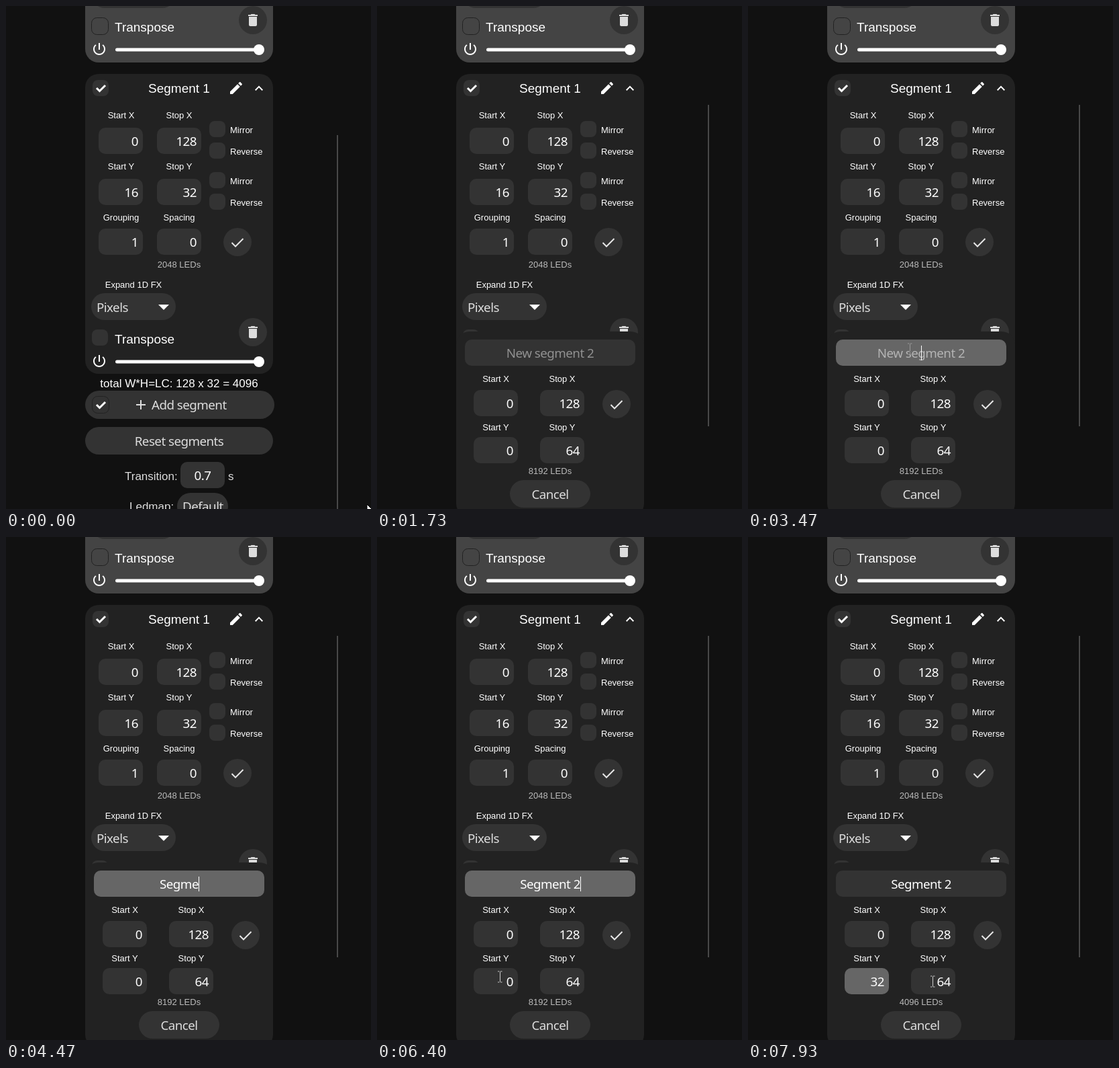
An HTML page that plays this animation: 544x748 px, repeating every 8000 ms.

```html
<!DOCTYPE html>
<html lang="en">
<head>
<meta charset="utf-8">
<title>Segment editor</title>
<style>
  html, body { margin: 0; width: 100%; height: 100%; overflow: hidden; background: #111; }
  svg { display: block; width: 544px; height: 748px; }
  text { white-space: pre; fill: #fff; font-family: "Liberation Sans", Arial, sans-serif; }
  .ui { font: 18.8px "Noto Sans", Tahoma, sans-serif; letter-spacing: -.55px; }
  .dim { fill: #ddd; }
  .note { fill: #bbb; }
  #beam { mix-blend-mode: difference; }
</style>
</head>
<body>
<svg id="stage" viewBox="0 0 544 748" xmlns="http://www.w3.org/2000/svg"></svg>
<script>
const LOOP = 8000, STEP = 1000 / 15;
const stage = document.getElementById('stage');

// ---- drawing helpers ----
const box = (x, y, w, h, r, fill = '#333', more = '') =>
  `<rect x="${x}" y="${y}" width="${w}" height="${h}" rx="${r}" fill="${fill}" ${more}/>`;
const text = (s, x, y, size, anchor = 'middle', more = '') =>
  `<text x="${x}" y="${y}" font-size="${size}" text-anchor="${anchor}" ${more}>${s}</text>`;
const ui = (s, x, y, anchor = 'middle', more = 'class="ui"') =>
  `<text x="${x}" y="${y}" text-anchor="${anchor}" ${more}>${s}</text>`;
const label = (s, x, y, anchor) => text(s, x, y, 13, anchor);
const icon = (d, x, y, fill = '#fff') => `<path d="${d}" transform="translate(${x} ${y})" fill="${fill}"/>`;
const stroke = (d, w, color = '#fff') => `<path d="${d}" fill="none" stroke="${color}" stroke-width="${w}"/>`;
const field = (s, x, y, id = '') =>
  box(x, y, 66, 39, 10, '#333', id && `id="${id}Box"`) +
  ui(s, x + 59, y + 27, 'end', `class="ui" id="${id}"`);
const tick = (x, y) => stroke(`M${x - 6} ${y}l4.5 4.5l8.5-8.5`, 3);
const okButton = (x, y) => `<circle cx="${x}" cy="${y}" r="21" fill="#333"/>` +
  stroke(`M${x - 8.5} ${y + 1}l5.5 5.5l11.5-11.5`, 2, '#e6e6e6');

const EDIT = 'M3 17.25V21h3.75L17.81 9.94l-3.75-3.75L3 17.25zM20.71 7.04c.39-.39.39-1.02 0-1.41l-2.34-2.34c-.39-.39-1.02-.39-1.41 0l-1.83 1.83 3.75 3.75 1.83-1.83z';
const UP = 'M12 8l-6 6 1.41 1.41L12 10.83l4.59 4.58L18 14z';
const BIN = 'M6 19c0 1.1.9 2 2 2h8c1.1 0 2-.9 2-2V7H6v12zM19 4h-3.5l-1-1h-5l-1 1H5v2h14V4z';
const POWER = 'M13 3h-2v10h2V3zm4.83 2.17l-1.42 1.42C17.99 7.86 19 9.81 19 12c0 3.87-3.13 7-7 7s-7-3.13-7-7c0-2.19 1.01-4.14 2.58-5.42L6.17 5.17C4.23 6.82 3 9.26 3 12c0 4.97 4.03 9 9 9s9-4.03 9-9c0-2.74-1.23-5.18-3.17-6.83z';

// lower part of a segment card
const cardFoot = (dy, check) => `<g transform="translate(0 ${dy})">
  ${box(127, 427, 126, 40, 20)}${check}
  ${text('Transpose', 162, 502, 19, 'start')}
  <circle cx="368" cy="485" r="21" fill="#333"/>${icon(BIN, 356, 473, '#ddd')}
  ${icon(POWER, 127, 516)}
  ${box(163, 526.5, 221, 5, 2.5, '#fff')}<circle cx="377" cy="529" r="8" fill="#fff"/></g>`;

const rows = [['Start X', 'Stop X', 0, 128, 181], ['Start Y', 'Stop Y', 16, 32, 257], ['Grouping', 'Spacing', 1, 0, 331]];

const topCard = box(118, -60, 280, 144, 20, '#444') +
  cardFoot(-464, box(127.5, 481.5, 25, 25, 8, '#444', 'stroke="#222"'));

const card = box(118, 101, 280, 446, 20, '#222') +
  box(129, 110, 24, 24, 8) + tick(141, 122) +
  text('Segment 1', 258, 129, 19) + icon(EDIT, 331, 110) + icon(UP, 365, 110.5) +
  rows.map(([a, b, u, v, y], i) => {
    const ly = 167 + 76 * i;
    return label(a, 171.5, ly) + label(b, 258, ly) + field(u, 138, y) + field(v, 225, y);
  }).join('') +
  [171, 203, 247, 279].map((y, i) =>
    box(303, y, 24, 24, 8) + label(i % 2 ? 'Reverse' : 'Mirror', 334, y + 18, 'start')).join('') +
  okButton(345, 351) +
  text('2048 LEDs', 258, 389, 13, 'middle', 'class="note"') +
  label('Expand 1D FX', 190, 419) +
  cardFoot(0, box(128, 481, 24, 24, 8)) +
  ui('Pixels', 135, 455, 'start', 'class="ui dim"') +
  '<path d="M227 444h16l-8 8z" fill="#fff"/>';

const listEnd = `<g id="listEnd">
  ${text('total W*H=LC: 128 x 32 = 4096', 258, 567, 17)}
  ${box(118, 572, 282, 42, 21, '#333', 'id="add"')}
  ${box(128.5, 580.5, 25, 25, 8, '#333', 'stroke="#222"')}${tick(141, 593)}
  ${stroke('M194 593h14M201 586v14', 2, '#ddd')}
  ${ui('Add segment', 217, 600, 'start', 'class="ui dim"')}
  ${box(118, 626, 280, 41, 20.5)}${ui('Reset segments', 258, 654, 'middle', 'class="ui dim"')}
  ${text('Transition:', 177, 705, 17, 'start', 'class="dim"')}
  ${box(260, 678, 66, 39, 10)}${ui('0.7', 293, 705)}
  ${text('s', 331, 705, 17, 'start', 'class="dim"')}
  ${text('Ledmap:', 184, 750, 17, 'start', 'class="dim"')}
  ${box(255, 724, 76, 40, 20)}${ui('Default', 263, 751, 'start', 'class="ui dim"')}</g>`;

const panel = `<g id="panel">
  ${box(118, 484, 280, 276, 20, '#222')}
  ${box(131, 496, 254, 39, 10, '#333', 'id="nameBox"')}
  ${ui('', 258, 523, 'middle', 'class="ui" id="name"')}
  ${label('Start X', 177, 559)}${label('Stop X', 276, 559)}
  ${field(0, 144, 571)}${field(128, 243, 571)}
  ${label('Start Y', 177, 631)}${label('Stop Y', 276, 631)}
  ${field(0, 144, 641, 'startY')}${field(64, 243, 641)}
  ${okButton(357, 592)}
  ${text('', 258, 696, 13, 'middle', 'class="note" id="leds"')}
  ${box(198, 705, 120, 41, 20.5)}${ui('Cancel', 258, 733, 'middle', 'class="ui dim"')}
  ${box(0, 0, 1, 22, 0, '#fff', 'id="caret"')}</g>`;

const pointers = `
  <path id="arrow" d="M0 0V16.5L4 13L6.5 19L9 18L6.5 12H12Z" fill="#fff" stroke="#000"/>
  <path id="hand" d="M-2 1.8Q0-1 2 1.8V7.5L7 8.7Q9.8 9.5 9.5 13L8 18V22H-1V19L-6.3 12.7Q-7.3 9.6-4.4 10.5L-2 12.5Z"
    fill="#fff" stroke="#000"/>
  <path id="beam" d="M-3-8H-.5M1-8H3.5M-3 8H-.5M1 8H3.5M.5-7.5V7.5" fill="none" stroke="#fff"/>`;

stage.innerHTML = box(0, 0, 544, 748, 0, '#111') + topCard + card + listEnd + panel +
  box(493, 0, 2, 1, 0, '#484848', 'id="edge"') + pointers;
const el = {};
stage.querySelectorAll('[id]').forEach(n => el[n.id] = n);

// ---- timeline ----
// pointer runs: [from, to, [time, x, y]...]
const runs = [
  [0, 1265, [0, 538, 741], [330, 425, 668], [870, 288, 600]],
  [1265, 1730, [1265, 288, 600]],
  [1865, 3530, [1860, 287, 594], [2200, 222, 624], [2600, 178, 652], [2800, 178, 652],
    [2867, 179, 646], [3280, 240, 512], [3467, 241, 510]],
  [5665, 6665, [5665, 240, 506], [6000, 180, 592], [6200, 177, 638], [6400, 183, 654]],
  [6865, 7195, [6865, 186, 655], [7130, 200, 658]],
  [7665, 8000, [7665, 201, 659], [7733, 236, 657], [7867, 285, 663], [7933, 275, 661]]
];
const names = [[0, ''], [3530, 'S'], [3730, 'Se'], [3930, 'Seg'], [4065, 'Segm'], [4200, 'Segmen'],
  [4465, 'Segme'], [4600, 'Segmen'], [4800, 'Segment'], [4930, 'Segment '], [5130, 'Segment 2']];
const starts = [[0, 0], [7265, 3], [7465, 32]];
const latest = (list, t) => list.filter(k => k[0] <= t).pop()[1];

function pointAt(keys, t) {
  const i = keys.findIndex(k => k[0] > t);
  if (i < 0) return keys[keys.length - 1].slice(1);
  if (!i) return keys[0].slice(1);
  const [a, b] = [keys[i - 1], keys[i]];
  let p = (t - a[0]) / (b[0] - a[0]);
  if (i === keys.length - 1) p = p * (2 - p);
  return [a[1] + (b[1] - a[1]) * p, a[2] + (b[2] - a[2]) * p];
}

const show = (node, on) => node.setAttribute('visibility', on ? 'visible' : 'hidden');
const fill = (node, c) => node.setAttribute('fill', c);

function pointer(t) {
  const run = runs.find(r => t >= r[0] && t < r[1]);
  const [x, y] = run ? pointAt(run.slice(2), t).map(Math.round) : [0, 0];
  const overAdd = t < 1265 && x < 400 && y > 571 && y < 614;
  const kind = !run ? '' : t >= 1265 ? 'beam' : overAdd ? 'hand' : 'arrow';
  for (const k of ['arrow', 'hand', 'beam']) {
    show(el[k], k === kind);
    el[k].setAttribute('transform', `translate(${x} ${y})`);
  }
  fill(el.add, overAdd ? '#555' : '#333');
}

function draw(ms) {
  const t = Math.floor((ms % LOOP + 4) / STEP) * STEP;
  const open = t >= 1265;
  show(el.listEnd, !open);
  show(el.panel, open);
  el.edge.setAttribute('y', open ? 147 : 192);
  el.edge.setAttribute('height', open ? 478 : 556);
  pointer(t);

  const onName = t >= 3330 && t < 6865, onStart = t >= 6865;
  const typed = latest(names, t), from = latest(starts, t);
  el.name.textContent = typed || 'New segment 2';
  el.name.style.fill = typed ? '#fff' : onName ? '#b4b4b4' : '#919191';
  fill(el.nameBox, onName ? '#666' : '#333');
  el.startY.textContent = from;
  fill(el.startYBox, onStart ? '#666' : '#333');
  el.leds.textContent = 128 * (64 - from) + ' LEDs';

  const half = typed ? el.name.getComputedTextLength() / 2 : 0;
  el.caret.setAttribute('x', onStart ? 203 : Math.round(258 + half));
  el.caret.setAttribute('y', onStart ? 650 : 505);
  show(el.caret, onName || (onStart && t < 7665));
}

const begin = performance.now();
function tickFrame() {
  draw(performance.now() - begin);
  requestAnimationFrame(tickFrame);
}
tickFrame();
</script>
</body>
</html>
```
